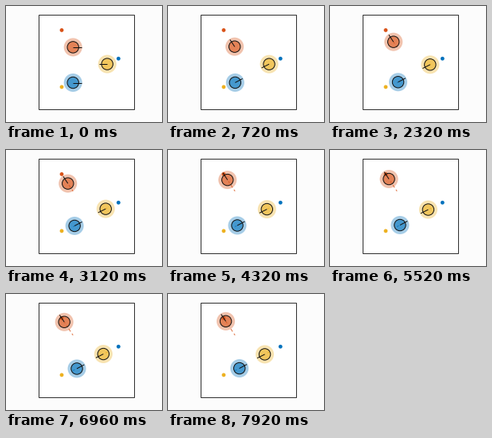
A matplotlib script that plays this animation: 196 by 146 pixels, repeating every 8000 ms.

```python
import numpy as np
import matplotlib.pyplot as plt
from matplotlib.animation import FuncAnimation
from matplotlib.patches import Circle, Rectangle

W, H, DPI = 196, 146, 100
PX = 72 / DPI
TICK, TICKS = 80, 100
TURN_STEPS, SLOW_STEP = 3, 22
ARM, BODY, HALO = 10.6, 7.2, 11.5
INK = "#101010"

# colour, start, goal, initial heading, fast speed, slow speed
ROBOTS = [
    ("#0072bd", (84.2, 96.5), (141.3, 66.2), 0, 0.17, 0.17),
    ("#d95319", (84.2, 51.9), (70, 30.4), 0, 0.90, 0.22),
    ("#edb120", (127.2, 73.1), (70, 101.9), 180, 0.17, 0.17),
]

fig = plt.figure(figsize=(W / DPI, H / DPI), dpi=DPI, facecolor="#fcfcfc")
ax = fig.add_axes([0, 0, 1, 1])
ax.set_xlim(0, W)
ax.set_ylim(H, 0)
ax.axis("off")
ax.add_patch(Rectangle((41.5, 10.5), 120, 119, fc="white", ec="#303030",
                       lw=PX, zorder=0))


class Robot:
    def __init__(self, color, start, goal, heading, fast, slow):
        self.start = np.array(start, float)
        gap = np.array(goal, float) - self.start
        self.dir = gap / np.hypot(*gap)
        self.turn_from = np.radians(heading)
        aim = np.arctan2(gap[1], gap[0])
        self.turn = (aim - self.turn_from + np.pi) % (2 * np.pi) - np.pi
        self.fast, self.slow = fast, slow

        ax.add_patch(Circle(goal, 2.4, fc=color, lw=0, zorder=1))
        self.trail, = ax.plot([], [], color=color, lw=PX, alpha=0.8,
                              dashes=(2.5, 3, 4, 3), dash_capstyle="butt",
                              zorder=2)
        self.halo = ax.add_patch(Circle(start, HALO, fc=color, lw=0,
                                        alpha=0.35, zorder=3))
        self.body = ax.add_patch(Circle(start, BODY, fc=color, lw=0,
                                        alpha=0.58, zorder=4))
        self.rim = ax.add_patch(Circle(start, BODY, fill=False, ec=INK,
                                       lw=PX, zorder=5))
        self.arm, = ax.plot([], [], color=INK, lw=PX,
                            solid_capstyle="butt", zorder=6)

    def travelled(self, step):
        quick = np.clip(step - TURN_STEPS, 0, SLOW_STEP - TURN_STEPS)
        return self.fast * quick + self.slow * max(step - SLOW_STEP, 0)

    def update(self, step):
        pos = self.start + self.dir * self.travelled(step)
        angle = self.turn_from + self.turn * min(step / TURN_STEPS, 1)
        tip = pos + ARM * np.array([np.cos(angle), np.sin(angle)])
        for disc in (self.halo, self.body, self.rim):
            disc.center = pos
        self.arm.set_data([pos[0], tip[0]], [pos[1], tip[1]])
        self.trail.set_data([self.start[0], pos[0]], [self.start[1], pos[1]])
        return [self.trail, self.halo, self.body, self.rim, self.arm]


robots = [Robot(*spec) for spec in ROBOTS]


def draw(tick):
    # five ticks hold two simulation steps
    step = (2 * tick + 2) // 5
    return [artist for robot in robots for artist in robot.update(step)]


anim = FuncAnimation(fig, draw, frames=TICKS, interval=TICK,
                     init_func=lambda: draw(0), repeat=True, repeat_delay=0)
plt.show()
```
